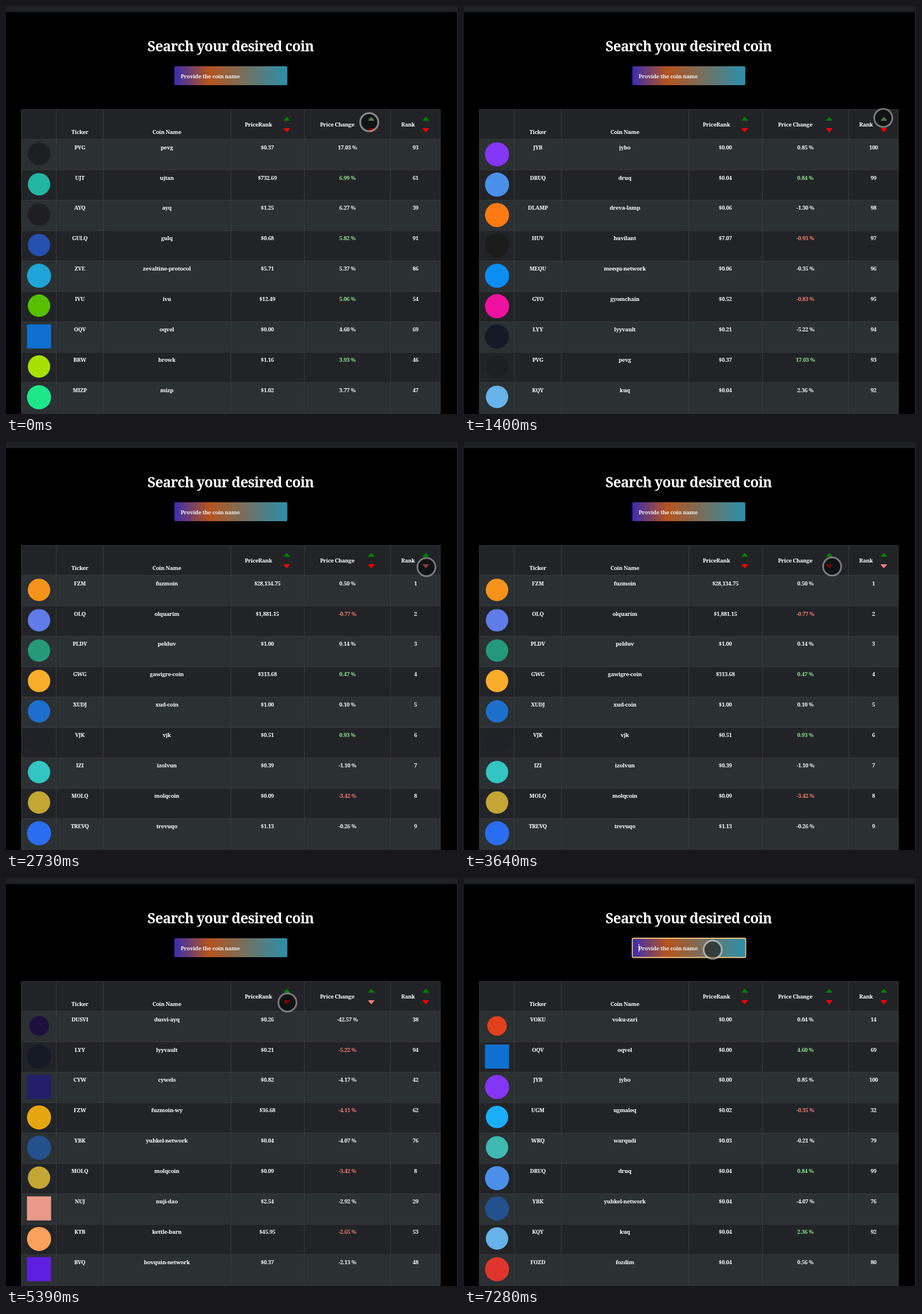
An HTML page that plays this animation: 787 px wide and 711 px high, repeating every 8 s.

```html
<!DOCTYPE html>
<html lang="en">
<head>
<meta charset="utf-8">
<title>Coin search</title>
<style>
html, body { margin: 0; width: 100%; height: 100%; overflow: hidden; background: #000; }
svg { display: block; width: 787px; height: 711px; }
text { font: 700 9.6px "Noto Serif", serif; letter-spacing: -.03em; fill: #fff; text-anchor: middle; }
.title { font-size: 24.4px; }
.hint { text-anchor: start; fill: #f0eef0; }
.gain { fill: #90ee90; }
.loss { fill: #fa8072; }
.line { stroke: #373b3e; fill: none; }
.arrow { fill: currentColor; stroke: currentColor; stroke-width: 1.8; stroke-linejoin: round; }
.up { color: #008000; }
.down { color: #f00; }
.up.on { color: #90ee90; }
.down.on { color: #f08080; }

.view, .focus, #cursor, #ring { animation: 8s step-end infinite; }
.view { opacity: 0; }
#view0 { animation-name: view0; }
#view1 { animation-name: view1; }
#view2 { animation-name: view2; }
#view3 { animation-name: view3; }
#view4 { animation-name: view4; }
@keyframes view0 { 0% { opacity: 1 } 14%, to { opacity: 0 } }
@keyframes view1 { 0% { opacity: 0 } 14% { opacity: 1 } 34.125%, to { opacity: 0 } }
@keyframes view2 { 0% { opacity: 0 } 34.125% { opacity: 1 } 51.625%, to { opacity: 0 } }
@keyframes view3 { 0% { opacity: 0 } 51.625% { opacity: 1 } 70%, to { opacity: 0 } }
@keyframes view4 { 0% { opacity: 0 } 70%, to { opacity: 1 } }

.focus { opacity: 0; animation-name: focus; }
#view4 .on { animation: blur 8s step-end infinite; }
@keyframes focus { 0% { opacity: 0 } 90.125%, to { opacity: 1 } }
@keyframes blur { 0% { opacity: 1 } 90.125%, to { opacity: 0 } }

#ring { animation-name: press; animation-timing-function: linear; }
@keyframes press {
  0% { stroke-opacity: .52 }
  3.5%, 90% { stroke-opacity: .42 }
  90.2%, to { stroke-opacity: .52 }
}
#cursor { animation-name: move; animation-timing-function: ease-in-out; }
@keyframes move {
  0%, 4.375% { transform: translate(632.5px, 202.5px) }
  10.5%, 18.375% { transform: translate(730px, 195px) }
  24.5% { transform: translate(729px, 216px) }
  26.25%, 27.125% { transform: translate(731px, 217px) }
  29.75%, 37.625% { transform: translate(732px, 218px) }
  39.375%, 40.25% { transform: translate(645px, 222px) }
  41.125%, 42% { transform: translate(643px, 222px) }
  42.875%, 43.75% { transform: translate(638px, 221px) }
  45.5% { transform: translate(641px, 217px) }
  49%, 55.125% { transform: translate(642px, 218px) }
  56.875% { transform: translate(525px, 213px) }
  58.625% { transform: translate(509px, 212px) }
  64.75%, 73.5% { transform: translate(490px, 217px) }
  78.75% { transform: translate(443px, 152px) }
  83.125%, 84% { transform: translate(466px, 128px) }
  85.75%, to { transform: translate(433px, 125px) }
}
</style>
</head>
<body>
<svg viewBox="0 0 787 711">
  <defs>
    <linearGradient id="fade">
      <stop offset="0" stop-color="#3a2db3"/>
      <stop offset=".31" stop-color="#b5541c"/>
      <stop offset="1" stop-color="#2a90ad"/>
    </linearGradient>
  </defs>
  <path fill="#202124" d="M0 0H787V711H785V10.5H0Z"/>
  <text class="title" x="391" y="78.7">Search your desired coin</text>
  <rect x="293.2" y="105" width="196.6" height="33" rx="2" fill="url(#fade)"/>
  <text class="hint" x="304" y="126">Provide the coin name</text>
  <g class="focus">
    <rect x="293" y="105" width="197.5" height="33.5" rx="2.5" fill="none" stroke="#efc37c" stroke-width="1.8"/>
    <path d="M304.5 115V129" stroke="#fff"/>
  </g>
  <g id="table"></g>
  <g id="cursor">
    <circle r="16" fill="#000" fill-opacity=".48"/>
    <circle id="ring" r="15.7" fill="none" stroke="#fff" stroke-width="3"/>
  </g>
</svg>
<script>
// ticker, name, price, change, rank, icon colour, icon radius (q = square)
const coins = `
VOKU voku-zari 0.00 0.04 14 #e0401c 17
OQV oqvel 0.00 4.60 69 #0f70d0 q
JYB jybo 0.00 0.85 100 #8436f6 21
UGM ugmaleq 0.02 -0.35 32 #1aaefa 19.5
WRQ warqudi 0.03 -0.21 79 #3fb8b2 19.5
DRUQ druq 0.04 0.84 99 #4a90e8 21
YBK yubkel-network 0.04 -4.07 76 #24508c 21
KQY kuq 0.04 2.36 92 #67b2e8 19.5
FOZD fozdim 0.04 0.56 80 #e0352c 21
PVG pevg 0.37 17.03 93 #1d1f23 19.5
UJT ujtan 732.69 6.99 61 #22b5a2 19.5
AYQ ayq 1.25 6.27 39 #1f1f21 19.5
GULQ gulq 0.68 5.82 91 #2450b0 19.5
ZVE zevaltine-protocol 5.71 5.37 86 #1fa5d8 21
IVU ivu 12.49 5.06 54 #58bf00 19.5
BRW browk 1.16 3.93 46 #a6e000 19.5
MIZP mizp 1.02 3.77 47 #20e68a 21
DLAMP dreva-lamp 0.06 -1.30 98 #fb7a12 21
HUV huvilant 7.07 -0.93 97 #1b1b1c 21
MEQU meequ-network 0.06 -0.35 96 #0b8df2 21
GYO gyomchain 0.52 -0.83 95 #f0109f 21
LYY lyyvault 0.21 -5.22 94 #141a26 21
FZM fuzmoin 28,134.75 0.50 1 #f7931a 19.5
OLQ olquarim 1,881.15 -0.77 2 #607ce9 19.5
PLDV pelduv 1.00 0.14 3 #24997a 19.5
GWG gawigre-coin 313.68 0.47 4 #f9ad2a 19.5
XUDJ xud-coin 1.00 0.10 5 #1e6fcd 19.5
VJK vjk 0.51 0.93 6 #1e2126 19.5
IZI izolvun 0.39 -1.10 7 #32c5c1 19.5
MOLQ molqcoin 0.09 -3.42 8 #c3a634 19.5
TREVQ trevuqo 1.13 -0.26 9 #2a6df0 21
DUSVI dusvi-ayq 0.26 -42.57 38 #1d0f40 17
CYW cywels 0.82 -4.17 42 #241f6b q
FZW fuzmoin-wy 36.68 -4.11 62 #e5a50f 21
NUJ nuji-dao 2.54 -2.92 29 #e99a8a q
KTB kettle-barn 45.95 -2.65 53 #fba25a 21
BVQ bovquin-network 0.37 -2.13 48 #5f1fe0 q`.trim().split("\n").map(line => {
  const [ticker, name, price, change, rank, color, size] = line.split(" ");
  return { ticker, name, price, change, rank, color, size };
});

const top0 = 232.4, pitch = 52.93, arrowX = { price: 488.8, change: 636, rank: 731 };
const value = s => +s.replace(",", "");
const text = (x, y, s, cls = "") => `<text x="${x}" y="${y}" class="${cls}">${s}</text>`;

function arrow(key, dir, on = "") {
  const base = dir > 0 ? 199.2 : 213.8;
  return `<path class="arrow ${dir > 0 ? "up" : "down"} ${on}" d="M${arrowX[key] - 4.3} ${base}h8.6l-4.3 ${-4.8 * dir}z"/>`;
}

function icon({ color, size }, y) {
  return size === "q"
    ? `<rect x="36.5" y="${y - 20.5}" width="42" height="42" fill="${color}"/>`
    : `<circle cx="57.5" cy="${size > 20 ? y + .7 : y}" r="${size}" fill="${color}"/>`;
}

function row(coin, i) {
  const y = top0 + pitch * i, base = y + 17.2;
  const tone = i % 2 ? (value(coin.change) < 0 ? "loss" : "gain") : "";
  return icon(coin, y + 25.3)
    + text(128.5, base, coin.ticker)
    + text(280, base, coin.name)
    + text(455, base, "$" + coin.price)
    + text(594.5, base, coin.change + " %", tone)
    + text(713, base, coin.rank);
}

function view([key, dir], n) {
  // an up arrow sorts from high to low
  const rows = [...coins].sort((a, b) => dir * (value(b[key]) - value(a[key]))).slice(0, 9);
  return `<g class="view" id="view${n}">${rows.map(row).join("")}${arrow(key, dir, "on")}</g>`;
}

function grid() {
  let out = '<rect x="26.5" y="180" width="730" height="531" fill="#222327"/>';
  let lines = "M26.5 180.5H756.5";
  for (let i = 0; i < 10; i++) {
    const y = top0 + pitch * i;
    if (i % 2 === 0) out += `<rect x="26.5" y="${y}" width="730" height="${pitch}" fill="#2b3033"/>`;
    lines += `M26.5 ${Math.round(y) + .5}H756.5`;
  }
  for (const x of [27, 87.5, 169.5, 391.5, 519.5, 669.5, 756]) lines += `M${x} 180V711`;
  return out + `<path class="line" d="${lines}"/>`;
}

const heads = text(128.5, 222.7, "Ticker") + text(280, 222.7, "Coin Name")
  + text(439.5, 210.2, "PriceRank") + text(576.7, 210.2, "Price Change") + text(700, 210.2, "Rank");
const arrows = Object.keys(arrowX).map(key => arrow(key, 1) + arrow(key, -1)).join("");
const orders = [["change", 1], ["rank", 1], ["rank", -1], ["change", -1], ["price", -1]];

document.getElementById("table").innerHTML = grid() + heads + arrows + orders.map(view).join("");
</script>
</body>
</html>
```
